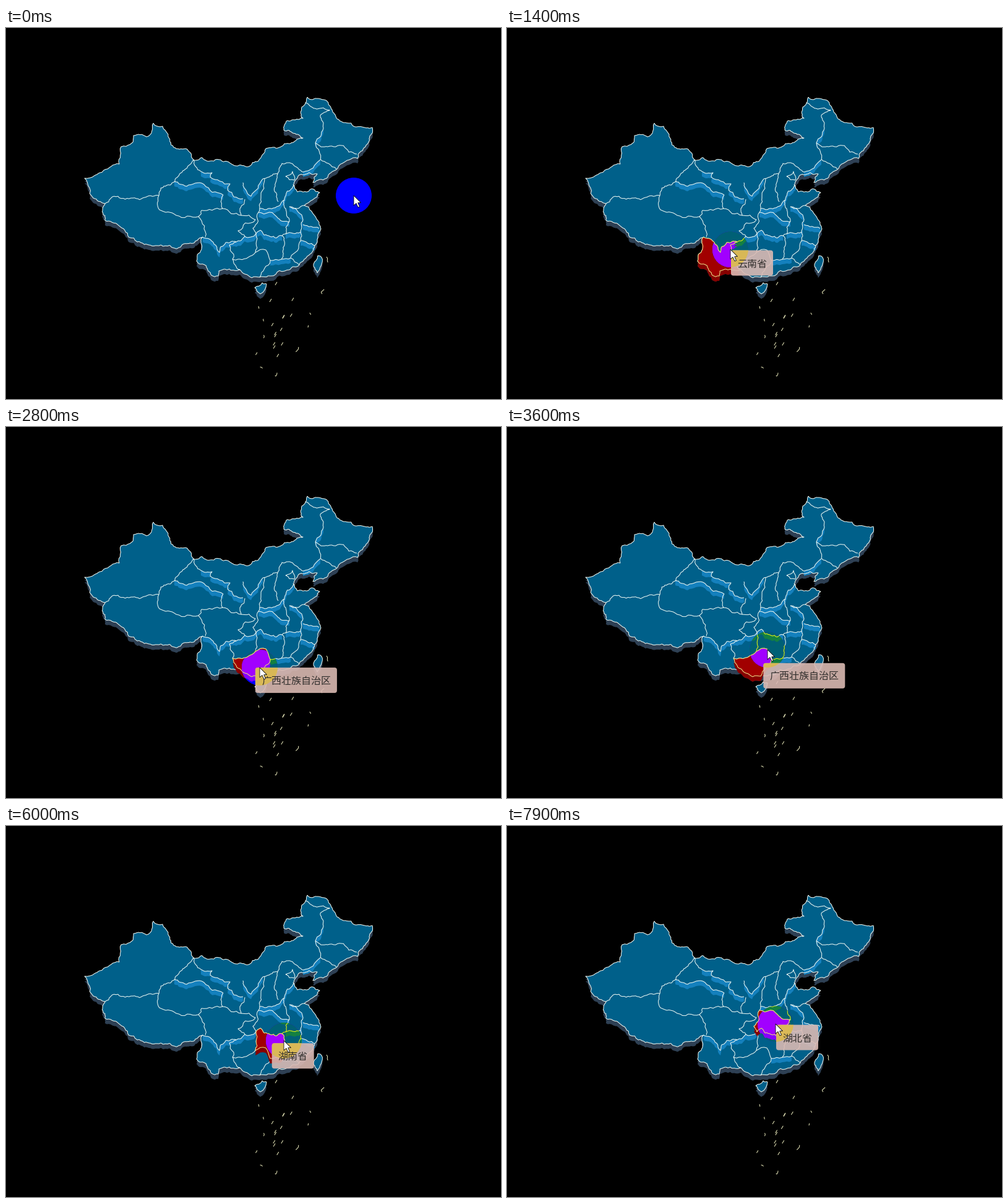
These frames come from a looping animation (800x600 px, 8000 ms). A matplotlib script:

```python
import numpy as np
import matplotlib.pyplot as plt
from matplotlib.animation import FuncAnimation
from matplotlib.collections import LineCollection, PolyCollection
from matplotlib.patches import Circle, FancyBboxPatch, Polygon
from matplotlib.path import Path

W, H, DPI = 800, 600, 100
STEP_MS, FRAMES = 100, 80
PX = 72 / DPI
SPOT_R, DEPTH = 29, 8
rng = np.random.default_rng(7)

SEA, LAND, CLIFF, SLATE = (0, 0, 0), (0, .376, .54), (.08, .5, .74), (.18, .25, .33)
LINE, ISLE = (.95, .98, .96), (.92, .92, .74)
RED, WALL, RIM = (.63, 0, 0), (.53, 0, 0), (.94, .9, .55)
PAPER = (.86, .73, .7)


def tint(color, inside):
    """The pointer spot inverts the blue channel."""
    r, g, b = color
    return (r, g, 1 - b) if inside else color


def line(*xy):
    """Ragged border through key points, by midpoint displacement."""
    p = np.reshape(xy, (-1, 2)).astype(float)
    while np.hypot(*np.diff(p, axis=0).T).max() > 5:
        d = np.diff(p, axis=0)
        normal = np.c_[-d[:, 1], d[:, 0]] * (np.hypot(*d.T) > 3)[:, None]
        mid = p[:-1] + d / 2 + normal * rng.uniform(-.17, .17, (len(d), 1))
        p = np.vstack([np.stack([p[:-1], mid], 1).reshape(-1, 2), p[-1:]])
    return p


def ring(*parts):
    return np.vstack(parts)


# Outer edge, clockwise from the south-west
tibet = line(318, 338, 303, 348, 276, 357, 250, 351, 228, 350, 198, 338, 160, 311, 160, 284)
xinjiang = line(160, 284, 141, 275, 127, 243, 158, 230, 183, 220, 186, 192, 201, 188,
                206, 174, 227, 176, 238, 154, 262, 172, 271, 193, 290, 195, 303, 213)
steppe = line(303, 213, 330, 215, 372, 223, 408, 215, 420, 195, 450, 187, 480, 178,
              449, 165, 454, 150, 480, 146, 478, 128, 484, 121)
northeast = line(484, 121, 487, 112, 521, 121, 533, 143, 565, 160, 592, 161, 581, 192,
                 568, 211, 535, 228, 496, 250, 503, 236, 490, 234, 468, 246)
coast = line(468, 246, 464, 254, 471, 265, 494, 260, 507, 266, 482, 287, 502, 309,
             509, 325, 499, 352, 487, 369, 474, 383)
gd_coast = line(474, 383, 458, 391, 428, 401, 410, 403)
gx_coast = line(410, 403, 386, 398, 378, 391)
yn_south = line(378, 391, 344, 393, 343, 401, 332, 400, 308, 377, 318, 338)
mainland = ring(tibet, xinjiang, steppe, northeast, coast, gd_coast, gx_coast, yn_south)
hainan = line(402, 420, 414, 412, 421, 414, 411, 430, 402, 420)
taiwan = line(504, 368, 510, 371, 503, 396, 497, 385, 504, 368)
tops = [mainland, hainan, taiwan]

# Borders of the provinces that light up
sc_yn = line(318, 338, 330, 342, 345, 363, 355, 347, 372, 346)
yn_gz = line(372, 346, 361, 351, 368, 366, 366, 374)
yn_gx = line(366, 374, 378, 391)
gz_north = line(372, 346, 386, 337, 404, 333)
gz_hn = line(404, 333, 403, 363)
gz_gx = line(403, 363, 378, 374, 366, 374)
hn_gx = line(403, 363, 420, 359, 427, 376)
gx_gd = line(427, 376, 410, 403)
hb_hn = line(404, 333, 411, 327, 446, 336)
hn_jx = line(446, 336, 445, 374)
hn_gd = line(445, 374, 427, 376)
hb_cq = line(404, 333, 399, 324, 408, 298)
ha_hb = line(408, 298, 440, 308, 458, 313)
hb_ah = line(458, 313, 452, 333)
hb_jx = line(452, 333, 446, 336)
jx_ah = line(452, 333, 476, 330)
jx_fj = line(476, 330, 476, 344, 460, 372)
jx_gd = line(460, 372, 445, 374)
fj_gd = line(460, 372, 474, 383)

PROVINCES = {
    "云南省": ring(sc_yn, yn_gz, yn_gx, yn_south),
    "贵州省": ring(gz_north, gz_hn, gz_gx, yn_gz[::-1]),
    "广西壮族自治区": ring(gz_gx[::-1], hn_gx, gx_gd, gx_coast, yn_gx[::-1]),
    "湖南省": ring(hb_hn, hn_jx, hn_gd, hn_gx[::-1], gz_hn[::-1]),
    "湖北省": ring(hb_cq, ha_hb, hb_ah, hb_jx, hb_hn[::-1]),
    "江西省": ring(hb_jx[::-1], jx_ah, jx_fj, jx_gd, hn_jx[::-1]),
    "广东省": ring(jx_gd[::-1], fj_gd, gd_coast, gx_gd[::-1], hn_gd[::-1]),
}
REGIONS = {name: Path(p) for name, p in PROVINCES.items()}

# Remaining borders; stepped ones show a cliff below the line
flat = [
    line(160, 284, 205, 275, 247, 271, 250, 259, 272, 249, 280, 237, 303, 213),
    line(247, 271, 248, 294, 275, 303, 311, 305, 322, 338),
    line(311, 305, 316, 295, 350, 292, 351, 270),
    line(350, 292, 380, 303, 378, 292, 386, 277),
    line(303, 213, 315, 232),
    line(418, 243, 412, 275, 408, 298),
    line(415, 244, 439, 236, 440, 281),
    line(439, 236, 446, 219, 480, 233),
    line(452, 240, 463, 232, 466, 246, 452, 240),
    line(450, 278, 452, 292, 458, 313),
    line(458, 289, 482, 287),
    line(380, 303, 403, 310, 375, 328, 386, 337),
    line(508, 212, 534, 228),
    line(508, 212, 500, 186, 520, 192, 567, 204),
    line(484, 121, 523, 133, 508, 141, 513, 162),
]
stepped = [
    line(272, 248, 292, 256, 320, 253, 351, 270),
    line(315, 232, 333, 234, 330, 241, 362, 252, 358, 262, 383, 276),
    line(383, 250, 390, 267, 396, 272, 415, 244),
    line(410, 292, 450, 278, 466, 254),
    line(458, 289, 480, 310, 476, 330),
    line(480, 318, 506, 324),
    line(476, 344, 499, 352),
    line(480, 233, 508, 213),
    line(500, 186, 513, 162),
    ha_hb, gz_north, hb_hn, jx_ah, sc_yn, hn_gd, jx_gd,
]
borders = tops + flat + stepped + [
    yn_gz, yn_gx, gz_hn, gz_gx, hn_gx, gx_gd, hn_jx, hb_cq, hb_ah, hb_jx, jx_fj, fj_gd]

# Island strokes: a ring of dashes around a loose scatter
loop = line(518, 370, 490, 455, 488, 490, 436, 563, 400, 534, 416, 487, 408, 450)
dashes = [loop[i:i + 4] for i in np.linspace(0, len(loop) - 4, 11).astype(int)]
for x, y in rng.uniform((428, 405), (472, 528), (14, 2)):
    dashes.append(np.array([(x, y), (x - 3, y + 5)]))

# Pointer moves: start and end in seconds, then where to
HOME = 562, 271
MOVES = [(0, .7, 395, 362), (.7, .8, 416, 362), (1.1, 1.3, 361, 358),
         (1.4, 1.9, 346, 362), (2, 2.3, 336, 376), (2.4, 2.8, 410, 389),
         (3.5, 3.6, 421, 360), (3.6, 3.8, 425, 356), (4.1, 4.4, 384, 355),
         (5.2, 5.6, 420, 351), (5.9, 6, 449, 347), (6, 6.3, 466, 342),
         (7, 7.4, 446, 376), (7.4, 7.8, 434, 320)]


def pointer(t):
    pos = np.array(HOME, float)
    for start, end, *goal in MOVES:
        u = np.clip((t - start) / (end - start), 0, 1)
        pos += (goal - pos) * u * u * (3 - 2 * u)
    return pos


fig = plt.figure(figsize=(W / DPI, H / DPI), dpi=DPI, facecolor=SEA)
ax = fig.add_axes([0, 0, 1, 1])
ax.set(xlim=(0, W), ylim=(H, 0))
ax.axis("off")
spot_parts = []
halos = {name: [] for name in PROVINCES}


def put(art, inside, z):
    art.set_zorder(z + 3 * inside)
    ax.add_collection(art)
    if inside:
        spot_parts.append(art)
    return art


def fill(polys, color, inside, z=1):
    return put(PolyCollection(polys, facecolor=tint(color, inside), edgecolor="none"), inside, z)


def stroke(paths, color, inside, z=1):
    return put(LineCollection(paths, colors=[tint(color, inside)], linewidths=PX), inside, z)


def drop(polys):
    return [p + (0, k) for p in polys for k in (DEPTH / 2, DEPTH)]


for inside in (False, True):
    fill(drop(tops), SLATE, inside)
    fill(tops, LAND, inside)
    fill([ring(p, p[::-1] + (0, DEPTH)) for p in stepped], CLIFF, inside)
    stroke(borders, LINE, inside)
    stroke(dashes, ISLE, inside)
    for name, p in PROVINCES.items():
        halos[name] += [fill(drop([p]), WALL, inside, 2),
                        fill([p], RED, inside, 2),
                        stroke([p], RIM, inside, 2)]

spot = ax.add_patch(Circle(HOME, SPOT_R, fc=tint(SEA, True), lw=0, zorder=3))
boxes = [ax.add_patch(FancyBboxPatch(
    (0, 0), 68, 41, boxstyle="round,pad=0,rounding_size=4",
    fc=tint(PAPER, inside), ec="none", alpha=.9, zorder=6 + inside))
    for inside in (False, True)]
spot_parts.append(boxes[1])
label = ax.text(0, 0, "", family="Noto Sans CJK JP", size=16 * PX, color="#33302e", zorder=8)
ARROW = np.array([(0, 0), (0, 16), (4, 12.5), (7, 19), (9.5, 18), (6.7, 11.7), (11.5, 11.5)])
arrow = ax.add_patch(Polygon(ARROW, fc="white", ec="black", lw=.8 * PX, zorder=9))


def update(i):
    t = i * STEP_MS / 1000
    pos = pointer(t)
    trail = .3 * pos + .7 * pointer(t - STEP_MS / 1000)  # hover and label lag behind
    name = next((n for n, r in REGIONS.items() if r.contains_point(trail)), "")
    spot.center = pos
    arrow.set_xy(ARROW + pos)
    for key, parts in halos.items():
        for art in parts:
            art.set_visible(key == name)
    x, y = trail + (1, 1.5)
    for box in boxes:
        box.set_visible(bool(name))
        box.set_bounds(x, y, 16 * len(name) + 20, 41)
    label.set_text(name)
    label.set_position((x + 10, y + 27))
    clip = Path.circle(pos, SPOT_R)
    for art in spot_parts:
        art.set_clip_path(clip, ax.transData)
    return []


anim = FuncAnimation(fig, update, frames=FRAMES, interval=STEP_MS,
                     repeat=True, repeat_delay=0)
plt.show()
```
